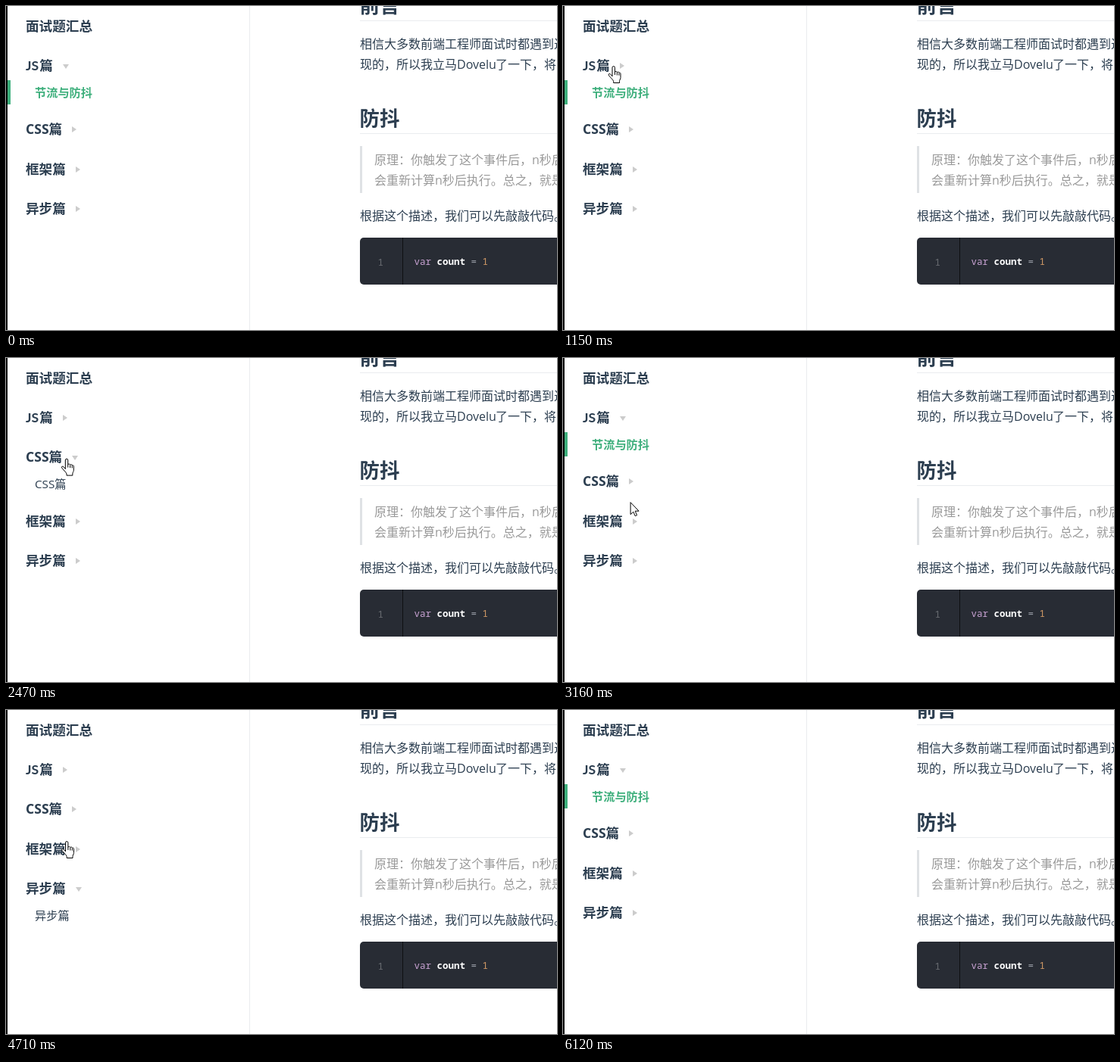
Animation of 727x428 px, one loop 7.46 s. Source, as an HTML page:

```html
<!DOCTYPE html>
<html lang="zh-CN">
<head>
<meta charset="utf-8">
<title>侧边栏</title>
<style>
  html, body { margin: 0; width: 100%; height: 100%; overflow: hidden; background: #fff; }
  svg { display: block; }
  text { font: 16px "Open Sans", "Noto Sans CJK SC", "Noto Sans CJK", sans-serif; fill: #2c3e50; white-space: pre; }
  .group text { font-size: 17.6px; font-weight: 700; }
  .js { font-family: Lato, sans-serif; }
  .sub text { font-size: 15.2px; font-weight: 400; }
  .sub .active { font-weight: 700; }
  .sub .active, .sub .hover { fill: #3eaf7c; }
  .mark { fill: #ccc; }
  .title { font-size: 26.4px; font-weight: 700; }
  .rule { fill: #eaecef; }
  .quote text { fill: #999; }
  .code text { font: 12.5px "Noto Sans Mono", "DejaVu Sans Mono", monospace; }
  #flash { fill: #fff96e; mix-blend-mode: multiply; }
  .pointer { fill: #fff; stroke: #000; stroke-linejoin: round; }
</style>
</head>
<body>
<svg width="727" height="428" viewBox="0 0 727 428">
  <rect width="2" height="428"/>
  <rect class="rule" x="321" width="1" height="428"/>

  <g class="group"><text x="26" y="33">面试题汇总</text></g>
  <g id="menu"></g>

  <text class="title" x="466.5" y="9">前言</text>
  <rect class="rule" x="467" y="19" width="260" height="1"/>
  <text x="467" y="56">相信大多数前端工程师面试时都遇到过</text>
  <text x="467" y="83">现的，所以我立马Dovelu</text>
  <text x="646" y="83">了一下，将</text>

  <text class="title" x="466.5" y="158">防抖</text>
  <rect class="rule" x="467" y="168" width="260" height="1"/>
  <g class="quote">
    <rect x="467" y="185" width="3" height="62" fill="#dfe2e5"/>
    <text x="486" y="209">原理：你触发了这个事件后，n秒后</text>
    <text x="486" y="236">会重新计算n秒后执行。总之，就是</text>
  </g>
  <text x="467" y="283">根据这个描述，我们可以先敲敲代码。</text>

  <g class="code">
    <rect x="467" y="306" width="280" height="62" rx="5" fill="#282c34"/>
    <rect x="523" y="306" width="1" height="62" fill="#0e0f12"/>
    <text x="490.5" y="343" style="fill:#696c72">1</text>
    <text x="538.5" y="342" style="fill:#c8a2d2">var <tspan fill="#fff" font-weight="600">count</tspan> <tspan fill="#9a9fa8">=</tspan> <tspan fill="#d19a66">1</tspan></text>
  </g>

  <circle id="flash" r="12.5"/>
  <path id="arrow" class="pointer" d="M.5.5V16.5L4.2 13 6.6 18.5 9 17.5 6.6 12H11.5Z"/>
  <g id="hand" class="pointer">
    <path transform="translate(-6.5)" d="M5.5 14V2.3a1.7 1.7 0 0 1 3.4 0V8.2a1.6 1.6 0 0 1 2.9.4 1.5 1.5 0 0 1 2.6.6 1.4 1.4 0 0 1 2.1 1.3V15.5c0 2-1.5 3-1.5 5V22.5H7.2V20.5C7 18.5 1.8 14.5.7 12.2.2 10.5 2 9.8 3.2 11.2L5.5 13.8M8.9 8v4M11.8 9v3.5M14.4 9.7v3"/>
  </g>
</svg>
<script>
const LOOP = 7460, FRAME = 77, FLASH = 60, OPEN = 100;
const LEFT = 26, ROW = 52.4, SUB = 32, HALF = 18;
const $ = id => document.getElementById(id);

// The pointer glides to each stop, then presses the heading there
const stops = [
  { leave: 70, arrive: 920, x: 66, y: 79, press: 1090, group: 0 },
  { leave: 1240, arrive: 1775, x: 80.5, y: 139, press: 1850, group: 1 },
  { leave: 2330, arrive: 2700, x: 70, y: 82, press: 2780, group: 0 },
  { leave: 2850, arrive: 3260, x: 92, y: 210, press: 3390, group: 2 },
  { leave: 3470, arrive: 3850, x: 81.5, y: 281, press: 4190, group: 3 },
  { leave: 4270, arrive: 4650, x: 79.5, y: 173, press: 4890, group: 2 },
  { leave: 5040, arrive: 5500, x: 68, y: 88, press: 5590, group: 0 },
  { leave: 5660, arrive: 6040, x: 640, y: 480 }
];

// At most one group is open; pressing the open one closes it
let current = 0;
const toggles = [{ at: -LOOP, open: 0 }];
for (const { press, group } of stops.filter(s => s.press)) {
  current = current === group ? -1 : group;
  toggles.push({ at: press + FLASH, open: current });
}

const groups = ['JS', 'CSS', '框架', '异步'].map((name, i) => {
  const el = document.createElementNS('http://www.w3.org/2000/svg', 'g');
  const active = i === 0;
  const head = active ? `<tspan class="js">${name}</tspan><tspan dx="1">篇</tspan>` : name + '篇';
  el.setAttribute('class', 'group');
  el.innerHTML = `<text x="${LEFT}" y="6">${head}</text><path class="mark"/>
    <svg class="sub" y="19" width="320" height="0">
      ${active ? `<rect x="2" width="4" height="${SUB}" fill="#3eaf7c"/>` : ''}
      <text class="${active ? 'active' : ''}" x="38" y="21.5">${active ? '节流与防抖' : name + '篇'}</text>
    </svg>`;
  $('menu').append(el);
  const [mark, box, label] = ['.mark', '.sub', '.sub text'].map(s => el.querySelector(s));
  const markX = Math.round(LEFT + el.querySelector('text').getBBox().width + 13);
  return { el, mark, box, label, markX, y: Math.round(79 + ROW * i) };
});

const snap = ms => Math.floor(ms / FRAME) * FRAME;
const mix = (a, b, u) => a + (b - a) * u;

function tipAt(t) {
  let from = { x: 640, y: 480 }, x = from.x, y = from.y;
  for (const s of stops) {
    if (t < s.leave) break;
    const u = Math.min(1, snap(t - s.leave + 1) / (s.arrive - s.leave));
    const e = u * u * (3 - 2 * u);
    x = mix(from.x, s.x, e);
    y = mix(from.y, s.y, e);
    from = s;
  }
  return [x, y];
}

function show(id, on, x, y) {
  $(id).setAttribute('visibility', on ? 'visible' : 'hidden');
  $(id).setAttribute('transform', `translate(${x} ${y})`);
}

function draw(t) {
  const [x, y] = tipAt(t);
  const n = toggles.filter(g => g.at <= t).length - 1;
  const { at, open } = toggles[n], last = n ? toggles[n - 1].open : open;
  const u = Math.min(1, snap(t - at) / OPEN), grown = 1 - (1 - u) ** 2;

  let shift = 0, over = false;
  groups.forEach((g, i) => {
    const h = SUB * ((i === open) * grown + (i === last) * (1 - grown));
    const dy = y - g.y - shift, inside = x < 320;
    const onSub = inside && dy > HALF && dy < HALF + h;
    g.el.setAttribute('transform', `translate(0 ${g.y + shift})`);
    g.box.setAttribute('height', h);
    g.mark.setAttribute('d', `M${g.markX}` + (i === open ? '-2h8l-4 6z' : '-4v8l6-4z'));
    g.label.classList.toggle('hover', onSub);
    over = over || onSub || inside && Math.abs(dy) <= HALF;
    shift += h;
  });

  show('flash', stops.some(s => t >= s.press && t < s.press + FLASH), x - 1, y + .5);
  show('hand', over, x, y);
  show('arrow', !over, x, y);
}

const began = performance.now();
function tick() {
  draw((performance.now() - began) % LOOP);
  requestAnimationFrame(tick);
}
tick();
</script>
</body>
</html>
```
